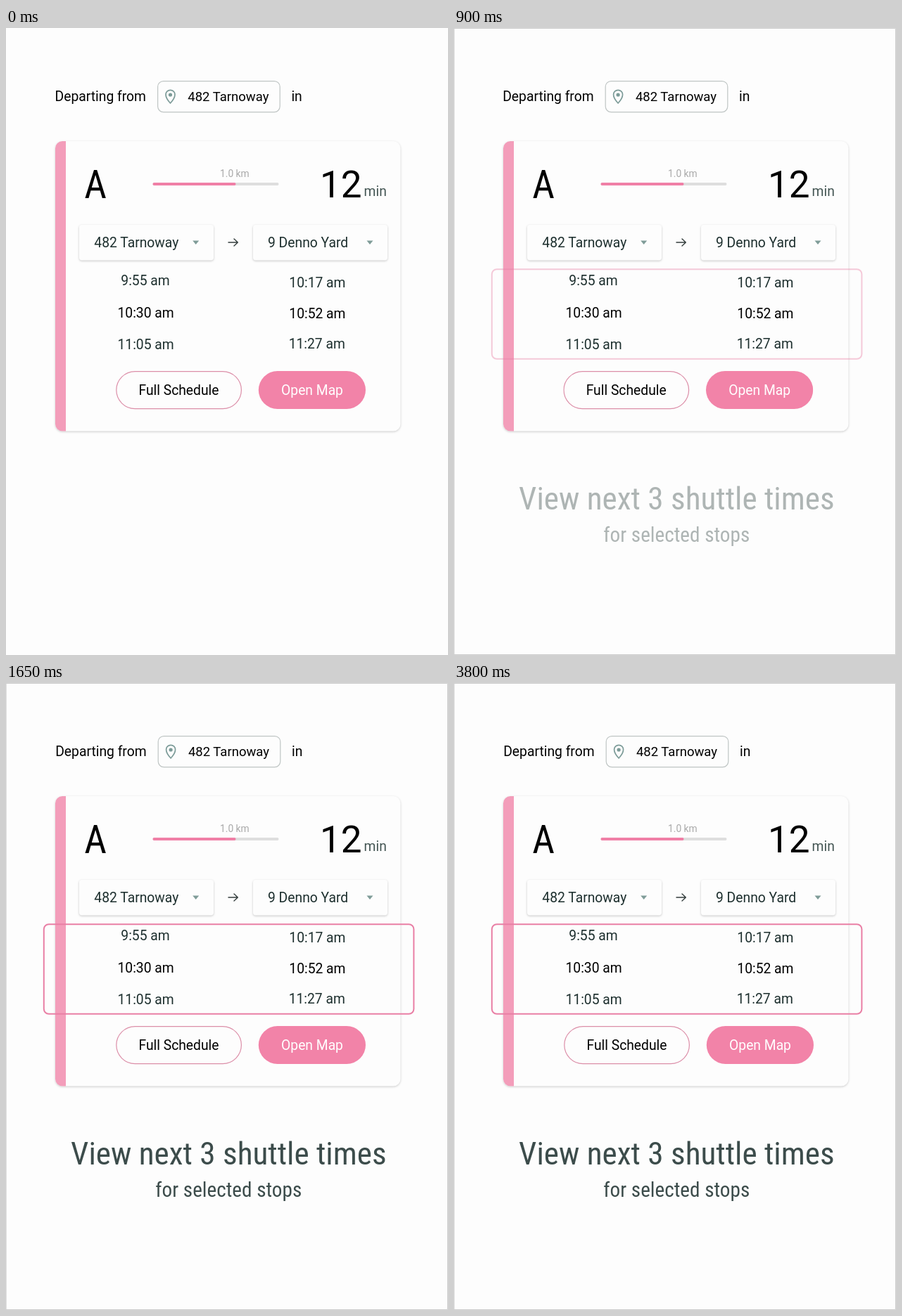
Recreate the animation shown at these times as an HTML page. Size 628 by 892 pixels, loop 4.05 s.

```html
<!DOCTYPE html>
<html lang="en">
<head>
<meta charset="utf-8">
<title>Shuttle times</title>
<style>
  html, body { margin: 0; width: 100%; height: 100%; overflow: hidden; background: #fdfdfd; }
  svg { display: block; width: 628px; height: 892px; }
  text { font: 19.3px Roboto, sans-serif; fill: #000; }
  .mid { text-anchor: middle; }
  .soft { fill: #1d2f2e; }
  .narrow {
    font-family: "Roboto Condensed", Roboto, sans-serif;
    font-stretch: 75%;
    font-variation-settings: "wdth" 75;
  }
  .route { font-size: 55px; }
  .minutes { font-size: 53px; text-anchor: end; }
  .unit { fill: #435553; }
  .distance { font-size: 13.8px; fill: #a9a9a9; }
  .address { font-size: 18.5px; }
  .title { font-size: 45.2px; fill: #3c4c4b; }
  .subtitle { font-size: 29.2px; fill: #3c4c4b; }

  .line { fill: none; stroke-linecap: round; stroke-linejoin: round; }
  .card { fill: #fdfdfd; filter: drop-shadow(0 1px 1.5px rgba(0, 0, 0, .2)); }
  .select { fill: #fdfdfd; filter: drop-shadow(0 1px 1.5px rgba(0, 0, 0, .22)); }
  .caret { fill: #7f9c98; }

  .callout, .edge, .top, .buttons { animation: 4050ms infinite; }
  .callout { animation-name: reveal; }
  .edge { animation-name: edge; }
  .top { animation-name: nudge-top; }
  .buttons { animation-name: nudge-buttons; }

  /* 50 ms is 1.2346% of the loop */
  @keyframes reveal {
    0% { opacity: 0; animation-timing-function: step-end; }
    19.7531% { opacity: .17; animation-timing-function: steps(2, end); }
    22.2222% { opacity: .41; animation-timing-function: steps(3, end); }
    25.9259% { opacity: .75; animation-timing-function: steps(2, end); }
    28.3951% { opacity: .91; animation-timing-function: steps(3, end); }
    32.0988%, 100% { opacity: 1; }
  }
  @keyframes edge {
    0% { opacity: 0; animation-timing-function: step-end; }
    19.7531% { opacity: .1; animation-timing-function: steps(2, end); }
    22.2222%, 100% { opacity: 1; }
  }
  @keyframes nudge-top {
    0% { transform: none; animation-timing-function: step-end; }
    19.7531% { transform: translateX(-.4px); animation-timing-function: step-end; }
    33.3333%, 100% { transform: translateX(.6px); }
  }
  @keyframes nudge-buttons {
    0% { transform: none; animation-timing-function: step-end; }
    19.7531% { transform: translateX(-.8px); animation-timing-function: step-end; }
    33.3333%, 100% { transform: none; }
  }
</style>
</head>
<body>
<svg viewBox="0 0 628 892" width="628" height="892">
  <defs>
    <clipPath id="cardShape"><rect x="70" y="161" width="490.5" height="412.5" rx="10"/></clipPath>
    <path id="caret" class="caret" d="M-4.5 -2.5H4.5L0 3Z"/>
  </defs>

  <g class="top">
    <text x="69.6" y="103.8">Departing from</text>
    <rect class="line" x="215.6" y="75.6" width="173.6" height="44" rx="8" stroke="#bfc5c4" stroke-width="1.2"/>
    <path class="line" d="M233.5 107C233.5 107 227 100 227 94.8a6.5 6.5 0 0 1 13 0C240 100 233.5 107 233.5 107Z" stroke="#7c9b98" stroke-width="1.7"/>
    <circle cx="233.5" cy="95" r="2.6" fill="#7c9b98"/>
    <text class="address" x="258.3" y="103.6">482 Tarnoway</text>
    <text x="405.4" y="103.8">in</text>
  </g>

  <rect class="card" x="70" y="161" width="490.5" height="412.5" rx="10"/>
  <rect x="70" y="161" width="15" height="413" fill="#f39dba" clip-path="url(#cardShape)"/>

  <text class="route narrow" x="111.3" y="242">A</text>
  <text class="distance" x="304" y="212">1.0 km</text>
  <path class="line" d="M210.5 222H385.5" stroke="#dedede" stroke-width="4"/>
  <path class="line" d="M210.5 222H324.5" stroke="#f07fa6" stroke-width="4"/>
  <text class="minutes" x="505.5" y="240.5">12</text>
  <text class="unit" x="508.6" y="238.8">min</text>

  <rect class="select" x="104" y="280" width="191" height="50.5" rx="4"/>
  <text class="soft" x="125.3" y="312">482 Tarnoway</text>
  <use href="#caret" x="269.7" y="305"/>
  <path class="line" d="M316 305H329M324 300L329.3 305L324 310" stroke="#333d3c" stroke-width="1.4"/>
  <rect class="select" x="351" y="280" width="191" height="50.5" rx="4"/>
  <text class="soft" x="372" y="312">9 Denno Yard</text>
  <use href="#caret" x="517" y="305"/>

  <g class="mid">
    <text class="soft" x="198" y="366.3">9:55 am</text>
    <text x="198.6" y="411.5">10:30 am</text>
    <text class="soft" x="198.6" y="456.6">11:05 am</text>
    <text class="soft" x="442.4" y="369">10:17 am</text>
    <text x="442.4" y="412.6">10:52 am</text>
    <text class="soft" x="441.8" y="456.2">11:27 am</text>
  </g>

  <g class="buttons mid">
    <rect class="line" x="156.8" y="488.6" width="177.6" height="53" rx="26.5" stroke="#dc8ea8" stroke-width="1.2"/>
    <text x="245.5" y="521.6">Full Schedule</text>
    <rect x="358.8" y="488" width="152.2" height="54" rx="27" fill="#f283a8"/>
    <text x="435" y="521.6" style="fill:#fff">Open Map</text>
  </g>

  <g class="callout mid">
    <rect class="line" x="53.8" y="343.2" width="525.6" height="127.6" rx="7" stroke="#e97fa5" stroke-width="2"/>
    <text class="title narrow" x="316.3" y="684.8">View next 3 shuttle times</text>
    <text class="subtitle narrow" x="316.3" y="731">for selected stops</text>
  </g>

  <rect class="edge line" x=".5" y=".5" width="627" height="891" stroke="#cbcbcb"/>
</svg>
</body>
</html>
```
